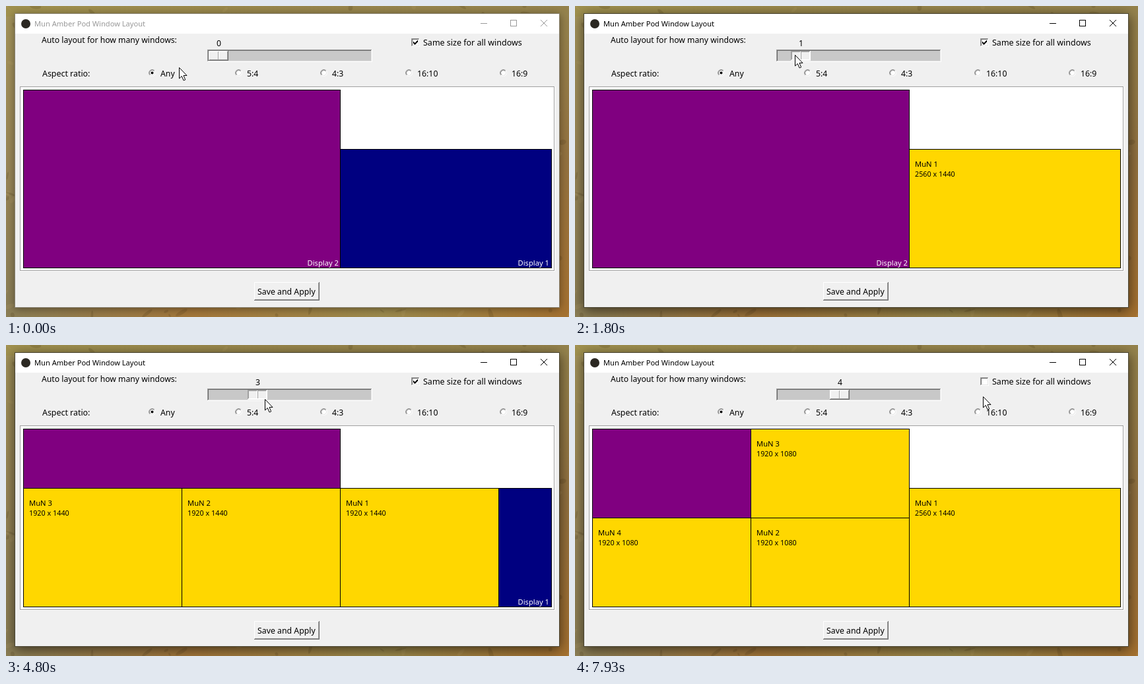
An HTML page with a canvas for the animation above (8 s loop, 853 by 472 pixels).

```html
<!DOCTYPE html>
<html lang="en">
<head>
<meta charset="utf-8">
<title>Window layout</title>
<style>
html, body { margin: 0; width: 100%; height: 100%; overflow: hidden; }
canvas { display: block; }
</style>
</head>
<body>
<canvas id="stage" width="853" height="472"></canvas>
<script>
const c = document.getElementById('stage').getContext('2d');
const FPS = 15, TICKS = 120;
const PRESS = 16, RELEASE = 87, UNCHECK = 108;
const GRAB = 323.1, STEP = 19.7;

// pointer moves: first tick, last tick, end x, end y
const moves = [
  [0, 4, 325, 84], [7, 10, 323, 75], [20, 24, 331, 74], [26, 30, 344, 75],
  [37, 42, 355, 77], [51, 59, 382, 80], [69, 75, 402, 84], [86, 92, 597, 69],
  [94, 98, 618, 62], [99, 104, 624, 54], [117, 119, 618, 78]
];

const clamp = (v, lo, hi) => Math.max(lo, Math.min(hi, v));

function pointerAt(k) {
  let x = 262, y = 93;
  for (const [from, to, endX, endY] of moves) {
    const u = clamp((k - from) / (to - from), 0, 1), e = u * u * (3 - 2 * u);
    x += (endX - x) * e;
    y += (endY - y) * e;
  }
  return [Math.round(x), Math.round(y)];
}

function box(x, y, w, h, color) {
  c.fillStyle = color;
  c.fillRect(x, y, w, h);
}

// one-pixel bevel: top and left, then bottom and right
function bevel(x, y, w, h, tl, br = tl) {
  box(x, y, w, 1, tl);
  box(x, y, 1, h, tl);
  box(x, y + h - 1, w, 1, br);
  box(x + w - 1, y, 1, h, br);
}

function bevel2(x, y, w, h, fill, outer, inner) {
  box(x, y, w, h, fill);
  bevel(x, y, w, h, ...outer);
  bevel(x + 1, y + 1, w - 2, h - 2, ...inner);
}

function sunken(x, y, w, h, fill) {
  bevel2(x, y, w, h, fill, ['#a0a0a0', '#fff'], ['#696969', '#e3e3e3']);
}

function text(s, x, y, size = 12.3, color = '#000', align = 'left') {
  c.font = size + 'px "Noto Sans", "Open Sans", sans-serif';
  c.textAlign = align;
  c.fillStyle = color;
  c.fillText(s, x, y);
}

function line(points, color) {
  c.beginPath();
  points.forEach(([x, y]) => c.lineTo(x, y));
  c.strokeStyle = color;
  c.lineWidth = 1;
  c.stroke();
}

function disc(x, y, r, color) {
  c.fillStyle = color;
  c.beginPath();
  c.arc(x, y, r, 0, 7);
  c.fill();
}

function strip(x, y, w, h, ...colors) {
  const g = w > h ? c.createLinearGradient(x, 0, x + w, 0) : c.createLinearGradient(0, y, 0, y + h);
  colors.forEach((color, i) => g.addColorStop(i / (colors.length - 1), color));
  box(x, y, w, h, g);
}

// soft old-map tones behind the window
function backdrop() {
  strip(0, 0, 20, 472, '#a3935a', '#998657', '#8a7d55');
  strip(833, 0, 20, 472, '#94824c', '#93713f', '#a4702f');
  strip(0, 0, 853, 16, '#a0914f', '#98864c', '#94824c');
  strip(0, 454, 853, 18, '#8a7d55', '#a4773a', '#9c8a4c', '#a4702f');
  let seed = 7;
  const rnd = () => (seed = seed * 16807 % 2147483647) / 2147483647;
  for (let i = 0; i < 400; i++) {
    c.fillStyle = i % 2 ? 'rgba(60,45,15,.16)' : 'rgba(190,170,110,.16)';
    c.beginPath();
    c.ellipse(rnd() * 853, rnd() * 472, 2 + rnd() * 8, 1 + rnd() * 3, rnd() * 3, 0, 7);
    c.fill();
  }
}

function frame(active) {
  c.save();
  c.shadowColor = active ? 'rgba(0,0,0,.6)' : 'rgba(0,0,0,.4)';
  c.shadowBlur = active ? 18 : 12;
  c.shadowOffsetY = active ? 4 : 2;
  box(13, 11, 826, 447, active ? '#4b4634' : '#8a8474');
  c.restore();
  box(14, 12, 824, 30, '#fff');
  box(14, 42, 824, 415, '#f0f0f0');
  const ink = active ? '#000' : '#999';
  disc(30, 27, 7, '#2b2822');
  text('Mun Amber Pod Window Layout', 43, 31, 11.1, ink);
  box(719, 26, 10, 1, ink);
  bevel(764, 21, 10, 10, ink);
  line([[810, 21], [820, 31]], ink);
  line([[820, 21], [810, 31]], ink);
}

function slider(n, pressed) {
  sunken(305, 66, 250, 19, '#c8c8c8');
  const x = Math.round(307 + n * STEP);
  text(n, x + 15.5, 61, 12.3, '#000', 'center');
  box(x, 68, 30, 15, '#f0f0f0');
  bevel(x, 68, 30, 15, ...(pressed ? ['#a0a0a0', '#fff'] : ['#fff', '#696969']));
  for (const half of [x + 1, x + 15])
    bevel(half, 69, 14, 13, ...(pressed ? ['#a0a0a0', '#fff'] : ['#fff', '#a0a0a0']));
}

function radio(x, label, on) {
  const ring = (r, tl, br) => [tl, br].forEach((color, i) => {
    const from = Math.PI * (.75 + i);
    c.strokeStyle = color;
    c.lineWidth = 1;
    c.beginPath();
    c.arc(x, 101.5, r, from, from + Math.PI);
    c.stroke();
  });
  disc(x, 101.5, 5, '#fff');
  ring(5, '#a0a0a0', '#fff');
  ring(4.1, '#696969', '#e3e3e3');
  if (on) disc(x, 101.5, 2, '#000');
  text(label, x + 12.5, 107);
}

function controls(n, pressed, checked) {
  text('Auto layout for how many windows:', 54, 56, 12.2);
  slider(n, pressed);
  sunken(614, 49, 13, 13, '#fff');
  if (checked)
    for (let i = 0; i < 7; i++) box(617 + i, 56 - Math.abs(i - 2), 1, 3, '#000');
  text('Same size for all windows', 632, 60, 12.5);
  text('Aspect ratio:', 55, 107, 12.4);
  radio(221.5, 'Any', true);
  radio(352.5, '5:4');
  radio(481.5, '4:3');
  radio(610.5, '16:10');
  radio(753.5, '16:9');
  bevel2(376, 419, 99, 28, '#f0f0f0', ['#fff', '#696969'], ['#f0f0f0', '#a0a0a0']);
  text('Save and Apply', 381, 438);
}

function area(x, y, w, h, color) {
  box(x, y, w + 1, h + 1, color);
  bevel(x, y, w + 1, h + 1, '#000');
}

// one stage pixel stands for eight screen pixels
function layout(n, sameSize) {
  const split = 506, bottom = 397;
  bevel2(21, 122, 811, 281, '#fff', ['#a0a0a0', '#fff'], ['#fff', '#a0a0a0']);
  area(26, 127, 480, 270, '#800080');
  text('Display 2', 504, 394, 11.2, '#fff', 'right');
  area(split, 217, 320, 180, '#000080');
  text('Display 1', 823, 394, 11.2, '#fff', 'right');

  for (let i = 0; i < n; i++) {
    const full = n < 3 || (!sameSize && i === 0);
    const w = full ? 320 : 240, h = full || n === 3 ? 180 : 135;
    // the first window fills the right display, the rest stack up from the split
    const rows = Math.floor(270 / h), j = i - 1;
    const x = i ? split - w * (1 + Math.floor(j / rows)) : split;
    const y = i ? bottom - h * (1 + j % rows) : 217;
    area(x, y, w, h, '#ffd700');
    text(`MuN ${i + 1}`, x + 9, y + 27, 11.2);
    text(`${w * 8} x ${h * 8}`, x + 9, y + 42, 10.8);
  }
}

const arrow = new Path2D('M0 0V16.5L3.8 13L6.6 19.5L9.2 18.4L6.5 12H11.5Z');

function pointer(x, y) {
  c.save();
  c.translate(x + .5, y + .5);
  c.fillStyle = '#fff';
  c.strokeStyle = '#000';
  c.lineWidth = 1;
  c.fill(arrow);
  c.stroke(arrow);
  c.restore();
}

function draw(k) {
  const [x, y] = pointerAt(k);
  const n = clamp(Math.round((x - GRAB) / STEP), 0, 4);
  const sameSize = k < UNCHECK;
  backdrop();
  frame(k >= PRESS);
  controls(n, k >= PRESS && k < RELEASE, sameSize);
  layout(n, sameSize);
  pointer(x, y);
}

let last = -1;
const start = performance.now();
function tick() {
  const k = Math.floor((performance.now() - start + 5) * FPS / 1000) % TICKS;
  if (k !== last) draw(last = k);
  requestAnimationFrame(tick);
}
tick();
</script>
</body>
</html>
```
